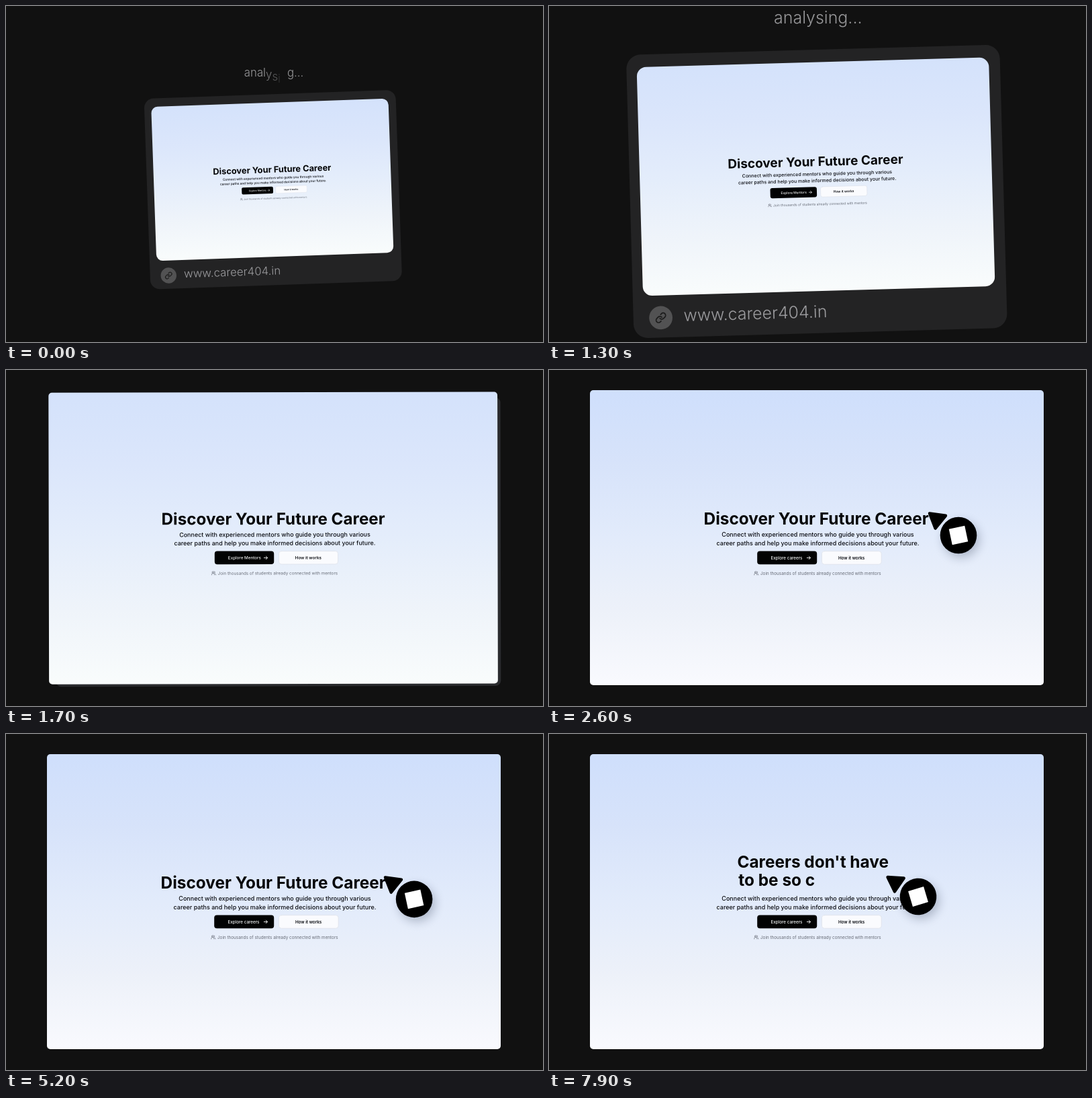
An HTML page with a canvas that plays this animation: 800 px wide and 500 px high, repeating every 8000 ms.

```html
<!DOCTYPE html>
<html lang="en">
<head>
<meta charset="utf-8">
<title>Landing page review</title>
<style>
  html, body { margin: 0; width: 100%; height: 100%; overflow: hidden; background: #111; }
  canvas { display: block; }
</style>
</head>
<body>
<canvas id="stage" width="800" height="500"></canvas>
<script>
const ctx = document.getElementById('stage').getContext('2d');
const LOOP = 8000;
const CENTER = { x: 399, y: 249.5 };
const SCREEN = { x: 61, y: 30, w: 676, h: 439 };

const clamp = v => Math.min(1, Math.max(0, v));
const lerp = (a, b, k) => a + (b - a) * k;
const ramp = (t, from, to) => clamp((t - from) / (to - from));
const smooth = k => k * k * (3 - 2 * k);
const easeOut = k => 1 - (1 - k) ** 3;

// cubic-bezier(.4, 0, .4, 1)
function zoomEase(k) {
  let lo = 0, hi = 1;
  for (let i = 0; i < 24; i++) {
    const s = (lo + hi) / 2;
    if (1.2 * s * (1 - s) + s ** 3 < k) lo = s; else hi = s;
  }
  return smooth(lo);
}

function layer(draw, alpha = 1) {
  if (alpha <= 0) return;
  ctx.save();
  ctx.globalAlpha *= alpha;
  draw();
  ctx.restore();
}

function box(x, y, w, h, r, fill, stroke) {
  ctx.beginPath();
  ctx.roundRect(x, y, w, h, r);
  ctx.fillStyle = fill;
  ctx.fill();
  if (stroke) {
    ctx.strokeStyle = stroke;
    ctx.lineWidth = 0.8;
    ctx.stroke();
  }
}

function disc(x, y, r, fill) {
  ctx.beginPath();
  ctx.arc(x, y, r, 0, Math.PI * 2);
  ctx.fillStyle = fill;
  ctx.fill();
}

function text(str, x, y, size, weight, color, align = 'left') {
  ctx.font = `${weight} ${size}px Inter, sans-serif`;
  ctx.textAlign = align;
  ctx.fillStyle = color;
  ctx.fillText(str, x, y);
}

function strokePath(d, color, width) {
  ctx.strokeStyle = color;
  ctx.lineWidth = width;
  ctx.lineCap = ctx.lineJoin = 'round';
  ctx.stroke(new Path2D(d));
}

function gradient(...colors) {
  const g = ctx.createLinearGradient(0, SCREEN.y, 0, SCREEN.y + SCREEN.h);
  colors.forEach((c, i) => g.addColorStop(i / (colors.length - 1), c));
  return g;
}

const skyEarly = gradient('#d4e2fb', '#dbe6fb', '#e4edfb', '#eff4fa', '#f9fcfc');
const skyLate = gradient('#cfdffc', '#d7e3fa', '#e2ebfb', '#edf1f9', '#f9fafe');

function drawStatus(t) {
  const word = 'analysing...';
  ctx.font = '300 32px Inter, sans-serif';
  [...word].forEach((ch, i) => {
    const x = 318 + ctx.measureText(word.slice(0, i)).width;
    const start = (i - 7) * 100;
    const k = t < start ? 1 : ramp(t, start, start + 400);
    layer(() => text(ch, x, -43 + 23 * (1 - k), 32, 300, '#98989a'), k);
  });
}

function drawCard(t) {
  const k = smooth(ramp(t, 1300, 1720));
  layer(() => {
    box(lerp(42, 72, k), lerp(7.8, 40, k), lerp(714, 667, k), lerp(541, 431.5, k),
        lerp(27, 8, k), k > 0.5 ? '#2a2b2e' : '#232324');
  }, 1 - ramp(t, 1740, 1880));
  layer(() => {
    disc(94.5, 511, 22.3, '#525253');
    text('www.career404.in', 138, 518.8, 32, 300, '#9b9b9e');
    ctx.translate(83.5, 500);
    ctx.scale(0.92, 0.92);
    strokePath('M10 13a5 5 0 0 0 7.54.54l3-3a5 5 0 0 0-7.07-7.07l-1.72 1.71' +
               'M14 11a5 5 0 0 0-7.54-.54l-3 3a5 5 0 0 0 7.07 7.07l1.71-1.71', '#1d1d1d', 2.5);
  }, 1 - ramp(t, 1310, 1400));
}

function drawTitle(t) {
  const put = (str, x, y) => text(str, x, y, 24.4, 700, '#050608');
  if (t < 7100) {
    const title = 'Discover Your Future Career';
    const erased = Math.floor(ramp(t, 6200, 7000) * title.length);
    put(title.slice(0, title.length - erased), 230.6, 229.8);
    return;
  }
  const first = "Careers don't have";
  const typed = Math.max(0, Math.floor((t - 7200) / 25 + 0.01));
  put(first.slice(0, typed), 280.4, 199);
  put('to be so confusing'.slice(0, Math.max(0, typed - first.length)), 282.3, 226);
}

function drawPage(t) {
  const late = ramp(t, 1800, 2000);
  const r = lerp(18, 5, smooth(ramp(t, 1300, 1700)));
  const { x, y, w, h } = SCREEN;
  // The screen sits slightly inset while it is part of the card.
  box(x + 0.6, y + 1.6, w - 3, h - 2.2, r, skyEarly);
  layer(() => box(x, y, w, h, r, skyLate), late);

  drawTitle(t);
  text('Connect with experienced mentors who guide you through various',
       400.5, 248, 9, 500, '#0b0d12', 'center');
  text('career paths and help you make informed decisions about your future.',
       400.5, 260.7, 9, 500, '#0b0d12', 'center');

  box(310.2, 269.4, 89, 19.8, 4, '#020303');
  text(late < 0.5 ? 'Explore Mentors' : 'Explore careers', 330.4, 281.6, 6.3, 500, '#f4f5f5');
  strokePath('M384.3 279.5h5.2M387.2 277.2l2.3 2.3l-2.3 2.3', '#f4f5f5', 0.9);

  box(406.4, 269.6, 88.8, 19.6, 4, '#fafbfe', '#dde1ea');
  text('How it works', 450.6, 281.6, 6.3, 600, '#0b0d12', 'center');

  text('Join thousands of students already connected with mentors', 315, 304.8, 6.35, 400, '#666b76');
  strokePath('M305.8 305v-.6a2 2 0 0 1 4 0v.6M306.5 301a1.3 1.3 0 1 0 2.6 0a1.3 1.3 0 1 0-2.6 0' +
             'M310 299.8a1.3 1.3 0 0 1 0 2.4M310.6 303a2 2 0 0 1 1.4 2', '#666b76', 0.7);
}

function drawCursor(t) {
  if (t < 1760) return;
  const enter = easeOut(ramp(t, 1760, 2600));
  const glide = smooth(ramp(t, 5100, 6050));
  ctx.translate(lerp(lerp(865, 610, enter), 550, glide), lerp(lerp(520, 246, enter), 242, glide));
  ctx.rotate(-4.6 * glide * Math.PI / 180);

  layer(() => {
    ctx.shadowColor = 'rgba(20, 30, 60, .25)';
    ctx.shadowBlur = 14;
    ctx.shadowOffsetX = 4;
    ctx.shadowOffsetY = 6;
    disc(0, 0, 27.3, '#000');
  });
  const arrow = 'M-43-32.6L-19-29.2L-34.4-10.4Z';
  ctx.fillStyle = '#000';
  ctx.fill(new Path2D(arrow));
  strokePath(arrow, '#000', 4.4);
  ctx.rotate(-12 * Math.PI / 180);
  ctx.fillStyle = '#fff';
  ctx.fillRect(-12, -12, 24, 24);
}

function drawBubble(t) {
  const show = easeOut(ramp(t, 2850, 3500));
  const hide = ramp(t, 4620, 4790);
  const scale = show * lerp(1, 0.7, hide);
  if (scale <= 0 || hide >= 1) return;
  const ox = lerp(600, 579, hide), oy = lerp(235, 279, hide);
  layer(() => {
    ctx.translate(ox, oy);
    ctx.scale(scale, scale);
    ctx.translate(-ox, -oy);
    box(583.8, 282.7, 155.6, 60.2, 11, '#e75052');
    ctx.fill(new Path2D('M578.6 279Q585 281.5 595 282.8L583.9 294Q583 285 578.6 279Z'));
    text('Focus the headline', 595.5, 307, 14, 500, '#fff');
    text('on the pain point.', 595.5, 326.8, 14, 500, '#fff');
  }, clamp(show * 2) * (1 - hide));
}

function render(t) {
  ctx.fillStyle = '#111';
  ctx.fillRect(0, 0, 800, 500);

  const zoom = zoomEase(ramp(t, 900, 1805));
  const tilt = -2 * (1 - smooth(ramp(t, 1100, 1800))) * Math.PI / 180;
  layer(() => {
    ctx.translate(lerp(397.3, CENTER.x, zoom), lerp(258.2, CENTER.y, zoom));
    ctx.scale(lerp(0.5252, 1, zoom), lerp(0.5252, 1, zoom));
    layer(() => {
      ctx.translate(-CENTER.x, -CENTER.y);
      drawStatus(t);
    }, 1 - ramp(t, 1310, 1400));
    ctx.rotate(tilt);
    ctx.translate(-CENTER.x, -CENTER.y);
    if (t < 1900) drawCard(t);
    drawPage(t);
  });

  layer(() => drawCursor(t));
  drawBubble(t);
}

const begin = performance.now();
function tick() {
  render((performance.now() - begin) % LOOP);
  requestAnimationFrame(tick);
}
tick();
</script>
</body>
</html>
```
